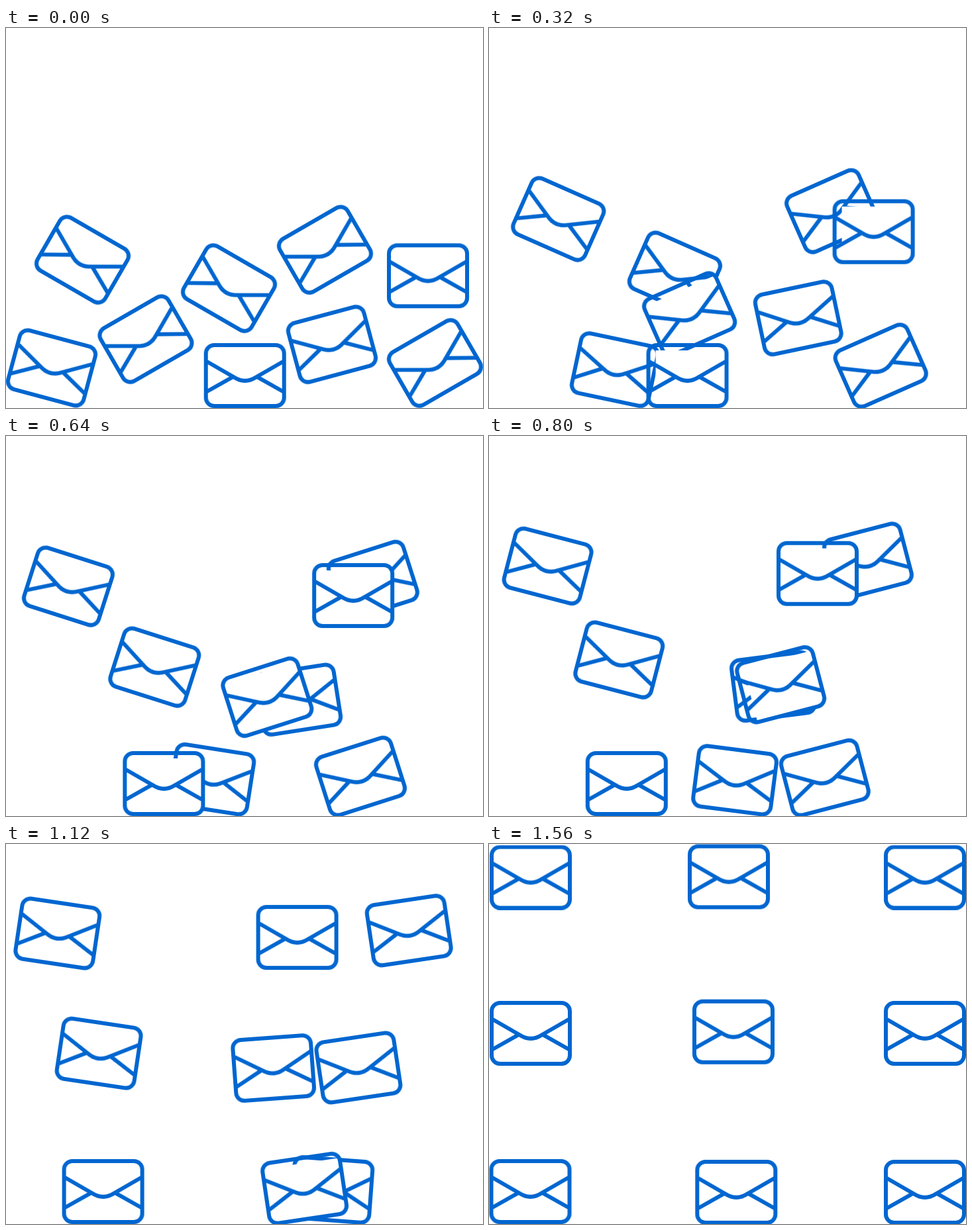
An HTML page that plays this animation: 720x574 px, repeating every 1600 ms.

```html
<!DOCTYPE html>
<html lang="en">
<head>
<meta charset="utf-8">
<title>Envelopes</title>
<style>
  html, body { margin: 0; width: 100%; height: 100%; overflow: hidden; background: #fff; }
  svg { display: block; width: 720px; height: 574px; }
  .mail {
    transform-origin: 0 0;
    animation: sort 1600ms steps(40, jump-none) infinite;
  }
  @keyframes sort {
    from { transform: translate(var(--x0), var(--y0)) rotate(var(--tilt, 0deg)); }
    to { transform: translate(var(--x1), var(--y1)) rotate(0deg); }
  }
</style>
</head>
<body>
<svg viewBox="0 0 720 574">
  <defs>
    <g id="mail">
      <!-- The white backing starts inside the top and left edges -->
      <path d="M-48-38H59V33Q59 46 46 46H-48Z" fill="#fff"/>
      <g fill="none" stroke="#0066d0" stroke-width="6">
        <rect x="-59" y="-46" width="118" height="92" rx="12.5"/>
        <path d="M-59-22L-17 2.2Q0 13.5 17 2.2L59-22M-59 25L-18 1.8M59 25L18 1.8"/>
      </g>
    </g>
  </defs>
  <!-- Back to front: start, end, initial tilt -->
  <use href="#mail" class="mail" style="--x0:115.5px; --y0:350px; --x1:63px; --y1:50.5px; --tilt:30deg"/>
  <use href="#mail" class="mail" style="--x0:69px; --y0:513.5px; --x1:658px; --y1:526px; --tilt:15deg"/>
  <use href="#mail" class="mail" style="--x0:336.5px; --y0:393px; --x1:63px; --y1:286px; --tilt:30deg"/>
  <use href="#mail" class="mail" style="--x0:481.5px; --y0:335px; --x1:658px; --y1:50.5px; --tilt:-30deg"/>
  <use href="#mail" class="mail" style="--x0:492px; --y0:478px; --x1:369px; --y1:283.7px; --tilt:-15deg"/>
  <use href="#mail" class="mail" style="--x0:211px; --y0:470px; --x1:658px; --y1:286px; --tilt:-30deg"/>
  <use href="#mail" class="mail" style="--x0:360.7px; --y0:525px; --x1:62.5px; --y1:525px"/>
  <use href="#mail" class="mail" style="--x0:637px; --y0:374.3px; --x1:362px; --y1:49.5px"/>
  <use href="#mail" class="mail" style="--x0:647.5px; --y0:506px; --x1:373.3px; --y1:526px; --tilt:-30deg"/>
</svg>
</body>
</html>
```
